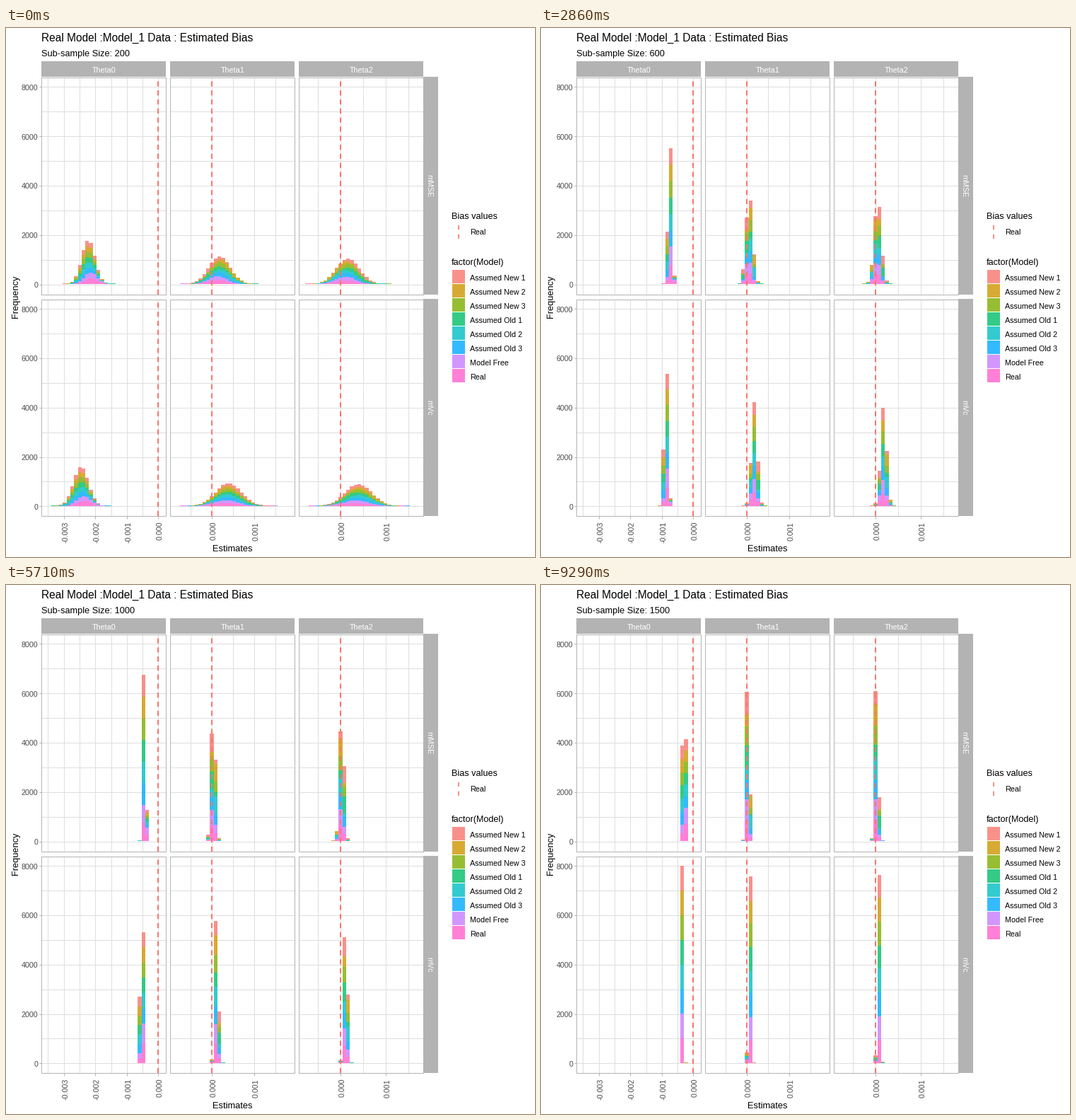
A matplotlib script that plays this animation: 748 by 748 pixels, repeating every 10000 ms.

```python
import math
import numpy as np
import matplotlib.pyplot as plt
from matplotlib.animation import FuncAnimation
from matplotlib.collections import PolyCollection
from matplotlib.colors import to_rgba
from matplotlib.patches import Rectangle

SIZE, DPI = 748, 88
FRAMES, INTERVAL = 200, 50
STEPS = 14
PT = 72 / DPI
BIN = 5.3                       # bar width in pixels
UNIT = 279.2 / 8000             # pixels per count
LEFT, WIDTH = (50.5, 232.5, 414.5), 175.5
ROWS = ((69.5, 377, 362.5), (383.5, 690, 676.3))   # top, bottom, zero line
ZERO = (215.5, 291.0, 473.0)
PER_MILLI = (44.6, 60.2, 64.2)  # pixels per 0.001
GREY70, GREY87, GREY30 = "#b3b3b3", "#dedede", "#4d4d4d"
RED = "#f8766d"

# stacked from the baseline upwards
MODELS = [("Real", "#ff61cc"), ("Model Free", "#c77cff"),
          ("Assumed Old 3", "#00a9ff"), ("Assumed Old 2", "#00bfc4"),
          ("Assumed Old 1", "#00be67"), ("Assumed New 3", "#7cae00"),
          ("Assumed New 2", "#cd9600"), ("Assumed New 1", "#f8766d")]
FILL = [to_rgba(c, 0.8) for _, c in MODELS]

# (a, b) of the law (a + b / n) / n, in bins: mean, then spread
LAWS = {
    (0, 0): ((-3740, 0), (212, 28e3)),
    (1, 0): ((-4470, 68e3), (190, 41e3)),
    (0, 1): ((405, 2500), (466, 21e3)),
    (1, 1): ((1360, -93e3), (285, 80e3)),
    (0, 2): ((352, 9000), (500, 22e3)),
    (1, 2): ((1450, -99e3), (303, 82e3)),
}

phi = np.vectorize(lambda z: 0.5 * math.erfc(-z / math.sqrt(2)))


def law(ab, n):
    return (ab[0] + ab[1] / n) / n


def share(edges, mu, sd):
    """Part of a slightly heavy-tailed bell inside each bin."""
    z = (edges - mu) / sd
    return np.diff(0.997 * phi(z) + 0.003 * phi(z / 1.7))


def shifts(row, col):
    """Distance of each model from the common mean, in spreads."""
    if col == 0:
        return np.array([0.4] * 2 + [-0.13] * 6)
    tilt = (-0.7 if col == 1 else 0.7) * (1, -0.65)[row]
    by_digit = {"1": tilt, "2": -tilt, "3": 0}
    return np.array([by_digit.get(name[-1], -0.25) for name, _ in MODELS])


def counts(row, col, n, edges):
    mean, spread = LAWS[row, col]
    mu, sd = law(mean, n), law(spread, n)
    shift = shifts(row, col)
    inner = sd * math.sqrt(1 - np.mean(shift ** 2))
    parts = np.array([share(edges, mu + s * sd, inner) for s in shift])
    total = 8000 * share(edges, mu, sd)
    return total, parts / np.maximum(parts.sum(axis=0), 1e-12) * total


def bars(n):
    verts, fills = [], []

    def box(x0, x1, y0, y1, fill):
        verts.append([(x0, y0), (x1, y0), (x1, y1), (x0, y1)])
        fills.append(fill)

    for row, col in LAWS:
        base = round(ROWS[row][2])
        first = -29 if col == 0 else -9
        bins = np.arange(first, first + 30)
        edges = np.append(bins, first + 30) - 0.5
        total, parts = counts(row, col, n, edges)
        for i, k in enumerate(bins):
            if total[i] < 1:
                continue
            x0 = round(ZERO[col] + edges[i] * BIN)
            x1 = round(ZERO[col] + edges[i + 1] * BIN)
            tops = np.rint(np.cumsum(parts[:, i]) * UNIT)
            if tops[-1] < 1:
                box(x0, x1, base, base - 1, FILL[k % 8])
                continue
            low = 0
            for top, fill in zip(tops, FILL):
                if top > low:
                    box(x0, x1, base - low, base - top, fill)
                low = top
    return verts, fills


fig = plt.figure(figsize=(SIZE / DPI, SIZE / DPI), dpi=DPI, facecolor="white")
ax = fig.add_axes([0, 0, 1, 1])
ax.set_xlim(0, SIZE)
ax.set_ylim(SIZE, 0)
ax.axis("off")


def text(x, y, s, px=10.75, color="black", ha="left", rot=0):
    return ax.text(x, y, s, fontsize=px * PT, color=color, ha=ha, va="baseline",
                   rotation=rot, rotation_mode="anchor",
                   family="Liberation Sans", zorder=6)


def line(x0, y0, x1, y1, color, z=1, px=1, **kw):
    ax.plot([x0, x1], [y0, y1], color=color, lw=px * PT, zorder=z,
            solid_capstyle="butt", dash_capstyle="butt", **kw)


def dashed(x, bottom, top, px, on):
    dash = (0, (on / px, (12.8 - on) / px))
    line(x, bottom, x, top, RED, z=4, px=px, linestyle=dash)


def rect(x0, y0, x1, y1, z=1, **kw):
    ax.add_patch(Rectangle((x0, y0), x1 - x0, y1 - y0, zorder=z, **kw))


def draw_panel(row, col):
    x0, x1 = LEFT[col], LEFT[col] + WIDTH
    top, bottom, zero = ROWS[row]
    for v in range(0, 8001, 1000):
        line(x0, zero - v * UNIT, x1, zero - v * UNIT, GREY87)
    for half in range(-8, 5):
        x = ZERO[col] + half / 2 * PER_MILLI[col]
        if x0 + 2 < x < x1 - 2:
            line(x, top, x, bottom, GREY87)
            if row == 1 and half % 2 == 0:
                line(x, bottom, x, bottom + 3.5, GREY70)
                text(x + 5.5, 698, f"{half / 2000:.3f}", color=GREY30,
                     ha="right", rot=90)
    dashed(ZERO[col], bottom, top, 2, 7.2)
    rect(x0, top, x1, bottom, z=5, fill=False, ec=GREY70, lw=PT)


for row, name in enumerate(("mMSE", "mVc")):
    top, bottom, zero = ROWS[row]
    for col in range(3):
        draw_panel(row, col)
    for v in range(0, 8001, 2000):
        y = zero - v * UNIT
        line(47, y, 50.5, y, GREY70)
        text(45.3, y + 4.5, str(v), color=GREY30, ha="right")
    rect(590, round(top - 0.5), 611, bottom, z=5, fc=GREY70, lw=0)
    text(594.8, (top + bottom) / 2, name, color="white", ha="center", rot=270)

for col in range(3):
    x0 = math.floor(LEFT[col])
    rect(x0, 47, x0 + 176, 69, fc=GREY70, lw=0)
    text(LEFT[col] + WIDTH / 2, 63, f"Theta{col}", color="white", ha="center")

text(50.5, 18.7, "Real Model :Model_1 Data : Estimated Bias", 15.55)
subtitle = text(50.5, 39.8, "", 12.75)
text(320.5, 740, "Estimates", 12.9, ha="center")
text(17, 379.5, "Frequency", 12.8, ha="center", rot=90)

text(630.5, 270, "Bias values", 12.65)
dashed(640.5, 297.5, 277.5, 1.6, 6.4)
text(656, 292, "Real")
text(630, 335, "factor(Model)", 12.65)
for i, (name, _) in enumerate(MODELS[::-1]):
    y = 342 + 20 * i
    rect(631, y, 649.5, y + 19, fc=FILL[7 - i], lw=0)
    text(656, y + 15, name)

stack = PolyCollection([], linewidths=0, antialiaseds=False, zorder=3)
ax.add_collection(stack, autolim=False)

SIZES = [200 + 100 * step for step in range(STEPS)]
STACKS = [bars(n) for n in SIZES]


def update(frame):
    # a step begins in the frame that contains its start time
    step = min((frame + 1) * STEPS // FRAMES, STEPS - 1)
    verts, fills = STACKS[step]
    stack.set_verts(verts)
    stack.set_facecolor(fills)
    subtitle.set_text(f"Sub-sample Size: {SIZES[step]}")
    return stack, subtitle


anim = FuncAnimation(fig, update, frames=FRAMES, interval=INTERVAL,
                     repeat=True, repeat_delay=0, blit=False)
plt.show()
```
